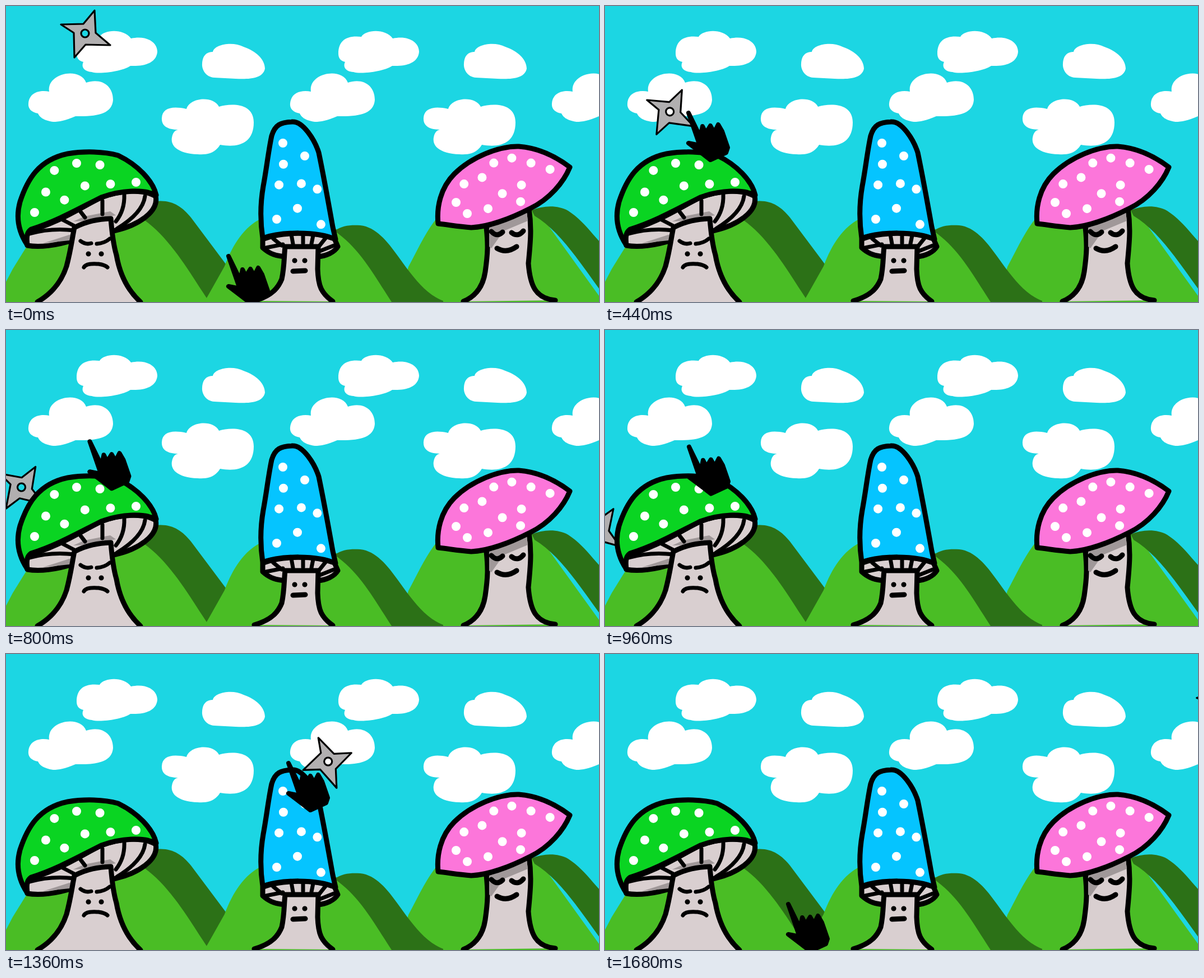
Animation of 1058x529 px, one loop 2.2 s. Source, as an HTML page:

```html
<!DOCTYPE html>
<html lang="en">
<head>
<meta charset="utf-8">
<title>Mushrooms and throwing stars</title>
<style>
  html, body { margin: 0; width: 100%; height: 100%; overflow: hidden; background: #1cd6e3; }
  svg { display: block; width: 100vw; height: 100vh; }
  .light { fill: #4abd25; }
  .dark { fill: #2c7117; }
  .ink { stroke: #000; stroke-width: 9; stroke-linecap: round; stroke-linejoin: round; }
  .line { fill: none; }
  .thin { stroke-width: 7; }
  .flesh { fill: #d9cfd0; }
  .shade { fill: #a09899; }
  /* Zero-length round dashes turn a path into evenly spaced spots. */
  .spots { fill: none; stroke: #fff; stroke-width: 16; stroke-linecap: round; stroke-dasharray: 0 1; }
  #hand { stroke-width: 8; }
</style>
</head>
<body>
<svg viewBox="0 0 1058 529">
  <defs>
    <g id="clouds" fill="#fff">
      <path d="M126 85C126 62 140 52 167 55C175 42 210 40 223 58C250 52 270 64 270 82C268 103 245 108 222 107C205 118 165 122 153 118C138 117 134 108 138 100C129 98 126 92 126 85Z"/>
      <path d="M350 103C351 86 360 82 369 82C372 68 405 63 424 73C445 80 462 95 462 112C458 130 435 131 410 130L372 128C355 127 349 112 350 103Z"/>
      <path d="M40 174C42 154 60 150 77 153C72 120 132 108 143 137C170 128 191 142 191 168C189 192 165 198 124 197C105 205 95 207 84 207C65 204 60 198 57 192C45 190 39 183 40 174Z"/>
      <path d="M278 200C279 183 295 178 322 184C328 163 370 160 380 180C400 174 442 172 442 208C442 245 415 254 382 248C372 264 358 266 342 265C310 264 293 252 296 235C298 225 302 222 307 221C288 221 277 214 278 200Z"/>
    </g>
    <path id="star" fill="#b1afb0" fill-rule="evenodd" stroke="#000" stroke-width="3.2" stroke-linejoin="round"
      d="M17-41L19-1L45 21L1 20L-19 43L-20-1L-43-16L-3-17ZM-7 0A7 7 0 1 0 7 0A7 7 0 1 0-7 0Z"/>
  </defs>

  <rect width="1058" height="529" fill="#1cd6e3"/>
  <use href="#clouds"/>
  <use href="#clouds" x="467"/>
  <use href="#clouds" x="934"/>

  <path class="light" d="M0 493L12 470L38 428L100 360L262 365L375 500L362 529H0Z"/>
  <path class="dark" d="M262 350C293 344 313 357 330 378L395 465L358 522C325 472 290 410 240 378Z"/>
  <path class="light" d="M700 529L718 466C735 435 750 400 772 375L860 330L950 368L1058 518V529Z"/>
  <path class="dark" d="M938 365C960 356 985 356 1003 366C1025 380 1040 400 1058 420V505C1020 452 985 400 943 375Z"/>
  <path class="light" d="M354 529L390 465C405 425 425 395 455 380L520 360L600 405L710 529Z"/>
  <path class="dark" d="M586 402C600 392 615 391 632 392C660 395 680 420 700 448C730 490 750 515 780 527V529H688C655 478 630 432 586 402Z"/>

  <use href="#star" id="star1"/>
  <use href="#star" id="star2"/>

  <g id="green">
    <path class="ink flesh" d="M267 340C273 368 235 392 196 401L118 419C90 428 60 432 38 428L33 404C90 390 130 362 170 342C205 329 245 327 267 340Z"/>
    <path class="shade" d="M66 424L122 406V418ZM120 385L140 376L186 367L196 374L150 384Z"/>
    <path class="ink line thin" d="M42 407Q80 396 122 401M97 380L122 393M131 365L141 378M172 348V372M211 337Q212 365 196 385M248 340Q244 370 198 398"/>
    <path class="ink" fill="#0ad422" d="M38 427C20 400 18 375 25 350C38 310 58 275 110 264C140 259 175 260 200 267C235 284 262 312 268 338C245 327 205 329 170 342C130 362 90 385 45 399C38 404 36 410 38 427Z"/>
    <path class="spots" pathLength="4.01" d="M51 369L68 340L86 294L126 281L168 284"/>
    <path class="spots" pathLength="3.01" d="M232 315L133 322L104 347"/>
    <path class="ink flesh" d="M56 529C85 512 100 490 108 465C116 435 118 415 122 396C145 384 165 381 187 380C189 405 191 425 197 445C203 480 217 508 240 529"/>
    <path class="ink line thin" d="M133 420Q142 427 152 424M162 425Q176 424 185 416M139 467C143 459 160 461 165 461C172 462 178 464 181 467"/>
    <path class="ink" d="M147 443h.1M170 443h.1"/>
  </g>

  <g id="blue">
    <path class="ink flesh" d="M458 417V432C470 443 482 447 500 448H555C572 447 586 440 592 430L586 416C550 403 490 403 458 417Z"/>
    <path class="ink line thin" d="M464 432L494 426M477 416L492 428M509 408L512 425M530 409V424M548 410L545 425M570 415L558 430M585 428L560 438"/>
    <path class="ink" fill="#05c4ff" d="M458 415C452 375 455 345 459 322C465 290 468 260 474 232C480 212 490 208 510 207C530 205 551 240 558 262C567 305 575 350 583 395L588 417C555 402 490 403 458 415Z"/>
    <path class="spots" pathLength="2.01" d="M494 245L495 285L487 320"/>
    <path class="spots" pathLength="2.01" d="M483 381L519 368L527 317"/>
    <path class="spots" pathLength="2.01" d="M533 268L556 329L562 391"/>
    <path class="ink flesh" d="M443 527C475 518 486 503 492 488C497 465 496 445 498 430H557L556 470C557 500 562 513 583 528"/>
    <path class="ink line" d="M512 474L534 473M515 455h.1M533 455h.1"/>
  </g>

  <g id="pink">
    <path class="ink flesh" d="M816 528C843 517 852 495 855 475C860 440 860 425 857 396L933 362C938 395 936 420 932 460C935 500 945 523 980 526"/>
    <path class="shade" d="M862 396L929 368L931 384L888 402L866 433L862 430Z"/>
    <path class="ink" fill="#fc76da" d="M771 389C768 360 775 325 800 300C830 270 880 250 915 251C955 254 985 272 1006 288C995 315 970 345 935 362C900 380 860 395 830 396C805 394 790 391 771 389Z"/>
    <path class="spots" pathLength="6.01" d="M803 351L819 314L859 304L873 275L908 271L971 292"/>
    <path class="spots" pathLength="4.01" d="M823 371L865 361L889 331L925 318L918 350"/>
    <path class="ink line" d="M866 403Q876 414 886 404M902 405Q913 414 923 402M876 433Q893 443 911 430"/>
  </g>

  <path id="hand" class="ink"
    d="M0 0L21 43L25 24L31 36L39 23L46 35L53 21L60 33L70 62L67 71L39 84L25 73L0 54L20 58Z"/>
</svg>

<script>
const LOOP = 2200, STEP = 40, LAST = 1680;
const GLIDE = 305, GRAVITY = 0.0004;
const $ = id => document.getElementById(id);

function place(id, x, y, angle = 0) {
  $(id).setAttribute("transform", `translate(${x} ${y}) rotate(${angle})`);
}

// The hand glides at constant speed to each stop, then waits for the next.
const home = { x: 397, y: 447 };
const stops = [
  { at: 0, x: 149, y: 191 },
  { at: 660, x: 150, y: 209 },
  { at: 960, x: 504, y: 195 },
  { at: 1360, x: 327, y: 447 }
];

function moveHand(t) {
  let { x, y } = home;
  for (const stop of stops) {
    const p = Math.max(0, Math.min(1, (t - stop.at) / GLIDE));
    x += (stop.x - x) * p;
    y += (stop.y - y) * p;
  }
  place("hand", x, y);
}

// A star drops steadily until the hand knocks it into a ballistic arc.
const stars = {
  star1: { start: 0, x: 141, y: 49, fall: 0.44, hit: 300, kickX: -0.245, kickY: 0, angle: 0, spin: 0.015 },
  star2: { start: 960, x: 506, y: -50, fall: 0.71, hit: 1325, kickX: 1.65, kickY: -0.5, angle: 18, spin: 0.073 }
};
const DRIFT = 0.03;

function moveStar(id, t) {
  const s = stars[id];
  const dropped = Math.min(t, s.hit) - s.start, flown = Math.max(0, t - s.hit);
  $(id).style.display = t < s.start ? "none" : "";
  place(id,
    s.x + DRIFT * dropped + s.kickX * flown,
    s.y + s.fall * dropped + s.kickY * flown + GRAVITY * flown ** 2,
    s.angle + s.spin * (t - s.start));
}

function draw() {
  const t = Math.min(LAST, Math.floor(performance.now() % LOOP / STEP) * STEP);
  moveHand(t);
  for (const id in stars) moveStar(id, t);
  requestAnimationFrame(draw);
}
draw();
</script>
</body>
</html>
```
